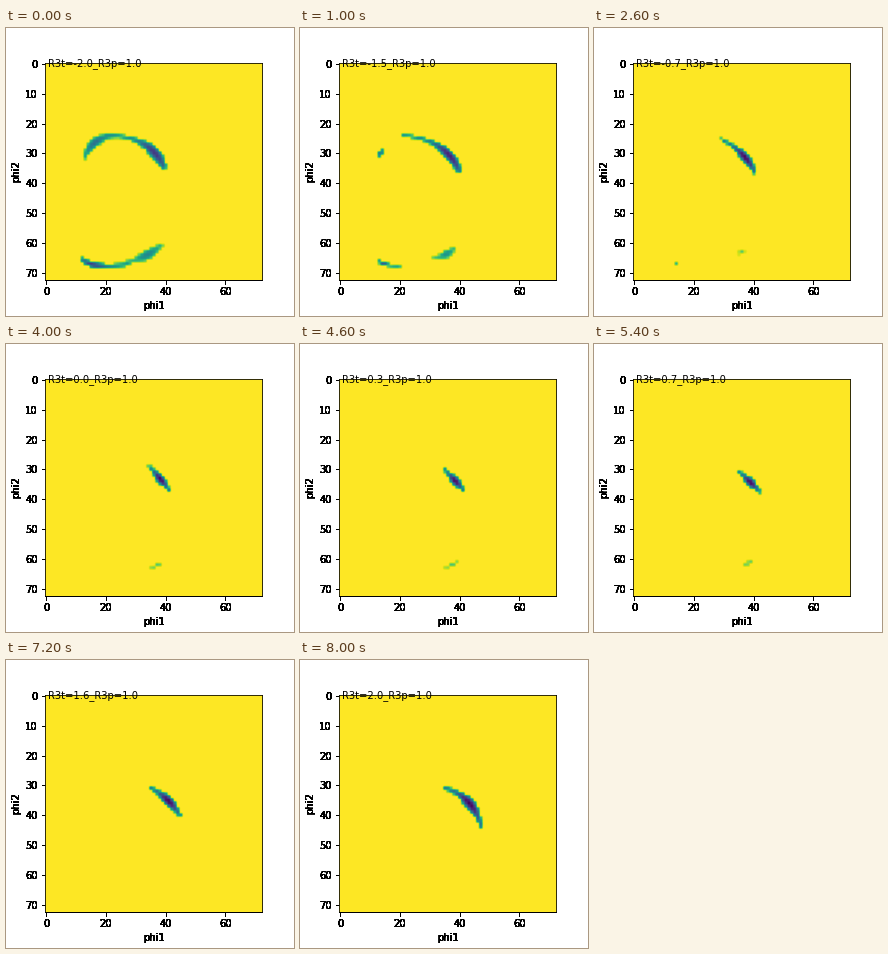
Write a matplotlib script that moves like this. It is 288x288 px and loops after 8.2 s.

```python
import numpy as np
import matplotlib.pyplot as plt
from matplotlib.animation import FuncAnimation

plt.rcParams.update({"font.family": "DejaVu Sans", "font.size": 10})

N = 73            # cells per axis
FRAMES = 41
LAYERS = 16
SAMPLES = 60
LIMITS = (-0.5, N - 0.5)

gx, gy = np.meshgrid(np.arange(N), np.arange(N))


def logistic(x):
    return 1 / (1 + np.exp(x))


def fade(step, end):
    return max(0, 1 - step / end)


def stroke(a, c, b, width, depth, taper=0.4, peak=0.5, span=(0, 1)):
    """Dip along the quadratic curve a-c-b, widest and deepest at peak."""
    s = np.linspace(0, 1, SAMPLES)[:, None, None]
    t = span[0] + (span[1] - span[0]) * s
    x, y = ((1 - t) ** 2 * p + 2 * t * (1 - t) * q + t ** 2 * r for p, q, r in zip(a, c, b))
    bump = np.exp(-((s - peak) / 0.28) ** 2)
    w = np.maximum(width * (taper + (1 - taper) * bump), 0.5)
    u = ((gx - x) ** 2 + (gy - y) ** 2) / w ** 2
    d = depth * (0.6 + 0.4 * bump)
    return np.where(u < 1, d * (1 - 0.6 * u), 0).max(axis=0)


def ridge(step):
    """Main dip: the tail is drawn in early, the tip runs out late."""
    s = step / (FRAMES - 1)
    pull = logistic((step - 12) / 2.4)
    tail = np.array([35 - 15 * pull, 31 - 7 * logistic((step - 17) / 3)])
    tip = np.array([39.2 + 3.4 * s + 4.4 * s ** 6, 34.4 + 3.6 * s ** 0.5 + 5.7 * s ** 9])
    bend = (5 * pull + 3.5 * s ** 10) * np.array([1, -1])
    return stroke(tail, (tail + tip) / 2 + bend, tip,
                  width=1.35 + 0.4 * (2 * s - 1) ** 2, depth=0.85 + 0.15 * min(1, 4 * s),
                  taper=0.35, peak=0.55 + 0.2 * pull)


def left_arc(step):
    left = fade(step, 9)
    return stroke((12.8, 31.3), (16, 23.5), (25, 24.3), width=1.5 * left ** 0.6, depth=0.65,
                  taper=0.5, peak=0.4, span=(0, max(0.22, 1 - 0.16 * step)))


def low_left(step):
    left = fade(step, 13.5)
    start = step / 65
    return stroke((12, 65.6), (15.5, 69), (27.5, 67.2), width=0.4 + 0.6 * left ** 2,
                  depth=0.35 + 0.5 * left ** 0.5, taper=0.7, peak=0.35,
                  span=(start, start + left ** 1.3))


def low_right(step):
    s = step / (FRAMES - 1)
    early = fade(step, 13)
    late = max(0, np.sin(np.pi * (step - 9) / 23))
    mid = np.array([34.6 + 6.2 * s ** 1.6 - 2.3 * early ** 4, 63.8 - 4.3 * s ** 1.7])
    half = (6 * early + 1.9 * late) * np.array([1, -0.48])
    return stroke(mid - half, mid + early * np.array([0.8, 1.6]), mid + half,
                  width=0.4 + 1.3 * early ** 0.5 + 0.2 * late,
                  depth=0.2 + 0.35 * early ** 0.5 + 0.2 * s, peak=0.6)


# Each part with the step after which it is gone
PARTS = ((ridge, FRAMES), (left_arc, 8), (low_left, 13), (low_right, 31))


def field(step):
    return 1 - np.max([part(step) for part, last in PARTS if step <= last], axis=0)


fig = plt.figure(figsize=(4, 4), dpi=72, facecolor="white")
fig.subplots_adjust(left=0.125, right=0.9, bottom=0.125, top=0.88)

# Stacked identical axes give the heavy labels
for i in range(LAYERS):
    ax = fig.add_subplot(111, label=str(i))
    ax.patch.set_visible(False)
    ax.set(xlim=LIMITS, ylim=LIMITS[::-1], aspect="equal", xlabel="phi1", ylabel="phi2",
           xticks=range(0, N, 20), yticks=range(0, N, 10))

image = ax.imshow(field(0), cmap="viridis", vmin=0, vmax=1, interpolation="hanning")
caption = ax.text(0.5, 0.85, "", color="black")


def update(step):
    image.set_data(field(step))
    caption.set_text(f"R3t={(step - 20) / 10:.1f}_R3p=1.0")
    return image, caption


anim = FuncAnimation(fig, update, frames=FRAMES, interval=200, repeat=True, repeat_delay=0)
plt.show()
```
